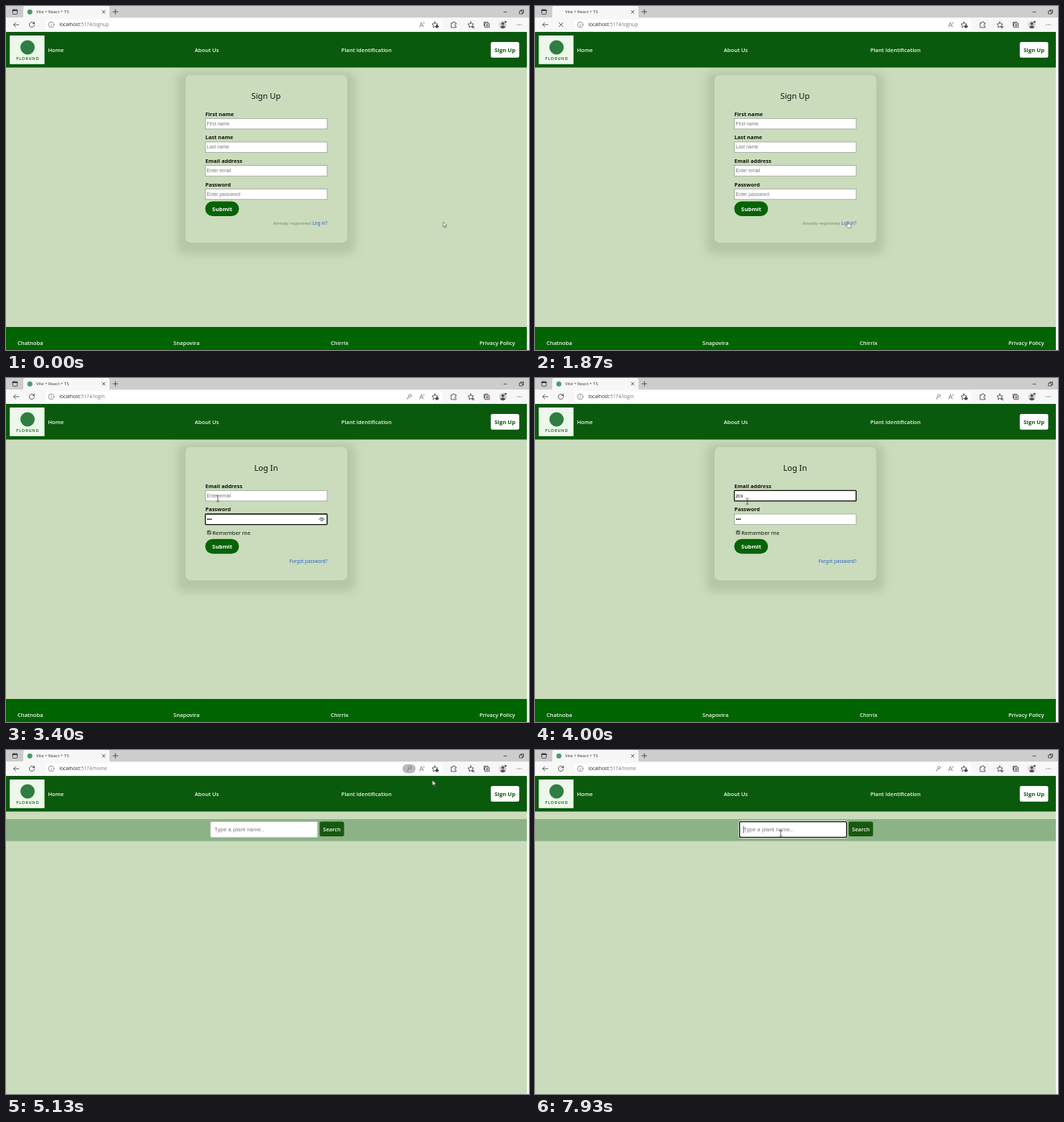
These frames come from a looping animation (728 px wide and 478 px high, 8000 ms). An HTML page:

```html
<!DOCTYPE html>
<html lang="en">
<head>
<meta charset="utf-8">
<title>Plant app walkthrough</title>
<style>
html, body { margin: 0; width: 100%; height: 100%; overflow: hidden; background: #f4f6f2; }
svg { display: block; width: 100vw; height: 100vh; }

.ui { font: 6.75px "Open Sans", "Noto Sans", sans-serif; fill: #777; }
.nav { font: 600 7.6px "Open Sans", "Noto Sans", sans-serif; fill: #f4faf2; }
.form { font: 600 7.45px "Noto Sans", "Open Sans", sans-serif; fill: #0c120a; }
.title { font-size: 11.2px; font-weight: 500; text-anchor: middle; }
.plain { font-size: 7.6px; font-weight: 400; }
.note { font-size: 6.15px; font-weight: 400; fill: #76866f; }
.link { font-size: 6.35px; font-weight: 400; fill: #2a62d0; }
.btn { font: 700 7.8px "Open Sans", "Noto Sans", sans-serif; fill: #fff; text-anchor: middle; }
.hint { font: 6.7px "Liberation Sans", Arial, sans-serif; fill: #7b7b7b; }
.typed { fill: #111; }
.field { fill: #fff; stroke: #8b9887; stroke-width: .7; }
.focus { fill: none; stroke: #0b0b0b; stroke-width: 1.3; }
.pill { fill: #066306; }
.shade { fill: #b4c6a5; filter: blur(6px); }
.card { fill: #cadcbc; }
.line { fill: none; stroke: #333; stroke-width: .8; stroke-linecap: round; stroke-linejoin: round; }
.soft { stroke: #777; }
.pointer { fill: #fff; stroke: #333; stroke-width: .6; stroke-linejoin: round; }

/* One loop is 8 s, so 1% is 80 ms. */
.t { animation: 8s step-end infinite; }
@keyframes signup { 0% { opacity: 1 } 26.25% { opacity: 0 } }
@keyframes login { 0% { opacity: 0 } 26.25% { opacity: 1 } 61.25% { opacity: 0 } }
@keyframes home { 0% { opacity: 0 } 61.25% { opacity: 1 } }
@keyframes footer { 0% { opacity: 1 } 61.25% { opacity: 0 } }
@keyframes loading { 0% { opacity: 0 } 22.5% { opacity: 1 } 26.25% { opacity: 0 } }
@keyframes loaded { 0% { opacity: 1 } 22.5% { opacity: 0 } 26.25% { opacity: 1 } }
@keyframes key { 0% { opacity: 0 } 27% { opacity: 1 } }
@keyframes badge { 0% { opacity: 0 } 61.5% { opacity: 1 } 66.5% { opacity: 0 } }
@keyframes passFocus { 0% { opacity: 0 } 31.5% { opacity: 1 } 43.5% { opacity: 0 } }
@keyframes passHint { 0% { opacity: 1 } 32.5% { opacity: 0 } }
@keyframes pass1 { 0% { opacity: 0 } 32.5% { opacity: 1 } }
@keyframes pass2 { 0% { opacity: 0 } 33.75% { opacity: 1 } }
@keyframes pass3 { 0% { opacity: 0 } 35% { opacity: 1 } }
@keyframes mailFocus { 0% { opacity: 0 } 43.5% { opacity: 1 } 53.5% { opacity: 0 } }
@keyframes mailHint { 0% { opacity: 1 } 45.5% { opacity: 0 } }
@keyframes mail1 { 0% { opacity: 0 } 45.5% { opacity: 1 } }
@keyframes mail2 { 0% { opacity: 0 } 47% { opacity: 1 } }
@keyframes mail3 { 0% { opacity: 0 } 48.5% { opacity: 1 } }
@keyframes hover { 0% { fill: #f4faf2 } 57.4% { fill: #c3ee5c } 60.5% { fill: #f4faf2 } }
@keyframes searchFocus { 0% { opacity: 0 } 81.25% { opacity: 1 } }
@keyframes caret { 0% { opacity: 0 } 81.25% { opacity: 1 } 87.875% { opacity: 0 } 94.5% { opacity: 1 } }

@keyframes arrow {
  0% { opacity: 1 } 9% { opacity: 0 } 25.5% { opacity: 1 } 30.5% { opacity: 0 }
  51% { opacity: 1 } 52.3% { opacity: 0 } 54.8% { opacity: 1 } 57.4% { opacity: 0 }
  60.5% { opacity: 1 } 75.5% { opacity: 0 }
}
@keyframes hand {
  0% { opacity: 0 } 9% { opacity: 1 } 25.5% { opacity: 0 } 52.3% { opacity: 1 }
  54.8% { opacity: 0 } 57.4% { opacity: 1 } 60.5% { opacity: 0 }
}
@keyframes beam { 0% { opacity: 0 } 30.5% { opacity: 1 } 51% { opacity: 0 } 75.5% { opacity: 1 } }

#cursor { animation: path 8s ease-in-out infinite; }
@keyframes path {
  0% { transform: translate(608.5px, 300px) }
  10%, 11.625% { transform: translate(441.5px, 300px) }
  18.75%, 23.75% { transform: translate(435.5px, 299px) }
  31.9%, 38.75% { transform: translate(320px, 196px) }
  42%, 49.4% { transform: translate(295px, 167.5px) }
  53%, 54.4% { transform: translate(303px, 234px) }
  57.75%, 59.4% { transform: translate(74.5px, 63.5px) }
  63.5%, 66.25% { transform: translate(593.5px, 42px) }
  78.75%, 83.75% { transform: translate(400px, 112px) }
  93.75%, 100% { transform: translate(342px, 116px) }
}
</style>
</head>
<body>
<svg viewBox="0 0 728 478">
  <rect y="36" width="725" height="442" fill="#cadcbc"/>

  <!-- Sign-up page -->
  <g class="t form" style="animation-name:signup">
    <rect class="shade" x="238" y="92" width="248" height="253" rx="10"/>
    <rect class="card" x="250" y="96" width="225" height="233" rx="7"/>
    <text class="title" x="362" y="129">Sign Up</text>
    <text x="277.5" y="152.7">First name</text>
    <text x="277.5" y="185.4">Last name</text>
    <text x="277.5" y="218">Email address</text>
    <text x="277.5" y="250.6">Password</text>
    <rect class="field" x="277.5" y="156.3" width="169.5" height="14.6"/>
    <rect class="field" x="277.5" y="189" width="169.5" height="14.6"/>
    <rect class="field" x="277.5" y="221.6" width="169.5" height="14.6"/>
    <rect class="field" x="277.5" y="254.2" width="169.5" height="14.6"/>
    <text class="hint" x="279.5" y="165.7">First name</text>
    <text class="hint" x="279.5" y="198.4">Last name</text>
    <text class="hint" x="279.5" y="231">Enter email</text>
    <text class="hint" x="279.5" y="263.6">Enter password</text>
    <rect class="pill" x="277.3" y="271.5" width="47" height="20.5" rx="10.2"/>
    <text class="btn" x="301" y="284.8">Submit</text>
    <text class="note" x="372" y="304.2">Already registered</text>
    <text class="link" x="447.5" y="304.2" text-anchor="end">Log in?</text>
  </g>

  <!-- Log-in page -->
  <g class="t form" style="animation-name:login">
    <rect class="shade" x="238" y="92" width="248" height="205" rx="10"/>
    <rect class="card" x="250" y="96" width="225" height="185" rx="7"/>
    <text class="title" x="362" y="129">Log In</text>
    <text x="277.5" y="152.7">Email address</text>
    <text x="277.5" y="185.4">Password</text>
    <rect class="field" x="277.5" y="156.3" width="169.5" height="14.6"/>
    <rect class="field" x="277.5" y="189" width="169.5" height="14.6"/>
    <text class="t hint" style="animation-name:mailHint" x="279.5" y="165.7">Enter email</text>
    <text class="t hint" style="animation-name:passHint" x="279.5" y="198.4">Enter password</text>
    <g class="hint typed">
      <text class="t" style="animation-name:mail1" x="279.5" y="165.7">z</text>
      <text class="t" style="animation-name:mail2" x="282.85" y="165.7">c</text>
      <text class="t" style="animation-name:mail3" x="286.2" y="165.7">x</text>
    </g>
    <g fill="#111">
      <circle class="t" style="animation-name:pass1" cx="280.9" cy="196.2" r=".95"/>
      <circle class="t" style="animation-name:pass2" cx="283.2" cy="196.2" r=".95"/>
      <circle class="t" style="animation-name:pass3" cx="285.5" cy="196.2" r=".95"/>
    </g>
    <rect class="t focus" style="animation-name:mailFocus" x="277.5" y="156.3" width="169.5" height="14.6" rx="1"/>
    <g class="t" style="animation-name:passFocus">
      <rect class="focus" x="277.5" y="189" width="169.5" height="14.6" rx="1"/>
      <path class="line" d="M435.5 196.5q4-5 8 0"/>
      <circle class="line" cx="439.5" cy="197.1" r="1.6"/>
    </g>
    <rect x="279.8" y="211.8" width="5.8" height="5.8" rx="1" fill="#5c6659"/>
    <path d="M281 214.8l1.3 1.3 2.3-2.9" fill="none" stroke="#fff" stroke-width=".8"/>
    <text class="plain" x="287.3" y="217.6">Remember me</text>
    <rect class="pill" x="277.3" y="223.8" width="47" height="20.5" rx="10.2"/>
    <text class="btn" x="301" y="237.2">Submit</text>
    <text class="link" x="447.5" y="256.6" text-anchor="end">Forgot password?</text>
  </g>

  <!-- Home page -->
  <g class="t" style="animation-name:home">
    <rect y="96" width="725" height="30.6" fill="#8db287"/>
    <rect x="284.7" y="99.6" width="149" height="21.8" rx="1.5" fill="#fff" stroke="#b9c4b6"/>
    <g class="t" style="animation-name:searchFocus">
      <rect x="283.6" y="98.5" width="151.2" height="24" rx="3" fill="none" stroke="#fff" stroke-width=".8"/>
      <rect class="focus" x="284.7" y="99.6" width="149" height="21.8" rx="2"/>
    </g>
    <text class="hint" style="font-size:7.9px" x="290" y="113">Type a plant name..</text>
    <path class="t line" style="animation-name:caret" d="M290.3 106v9"/>
    <rect x="436.6" y="99.5" width="34" height="20.5" rx="2.5" fill="#175a0f"/>
    <text class="nav" x="453.6" y="112.8" text-anchor="middle">Search</text>
  </g>

  <!-- Site header and footer -->
  <rect y="36" width="725" height="49.5" fill="#0a5a0d"/>
  <rect x="5.2" y="41" width="48.4" height="39.8" fill="#ecf8ea"/>
  <circle cx="30" cy="57.5" r="10" fill="#2f7d40"/>
  <text x="30.4" y="74.7" text-anchor="middle" fill="#23622f" style="font:700 5.4px Lato,sans-serif;letter-spacing:.9px">FLORUND</text>
  <g class="nav">
    <text class="t" style="animation-name:hover" x="58.4" y="64.2">Home</text>
    <text x="262.8" y="64.2">About Us</text>
    <text x="466.8" y="64.2">Plant Identification</text>
  </g>
  <rect x="674.8" y="50" width="39.6" height="21.8" rx="2.5" fill="#fff"/>
  <text class="btn" style="fill:#0c520e" x="694.6" y="64.3">Sign Up</text>
  <g class="t nav" style="animation-name:footer">
    <rect y="446" width="725" height="32" fill="#006400"/>
    <text x="16" y="470.6">Chatnoba</text>
    <text x="233" y="470.6">Snapovira</text>
    <text x="452" y="470.6">Chirrix</text>
    <text x="708.6" y="470.6" text-anchor="end">Privacy Policy</text>
  </g>

  <!-- Browser window -->
  <rect width="728" height="17" fill="#cdcdcd"/>
  <rect y="16" width="728" height="20" fill="#f7f7f7"/>
  <path d="M22 16.5q2 0 2-2V3q0-3 3-3h114q3 0 3 3v11.5q0 2 2 2z" fill="#f7f7f7"/>
  <rect x="55" y="18.5" width="552" height="15" rx="3" fill="#fff"/>
  <g class="line">
    <rect x="9.3" y="5" width="6.4" height="6.4" rx="1"/>
    <path d="M9.5 6.2h6" stroke-width="1.7"/>
    <path d="M134 6.1l4 4m0-4l-4 4M149 8h6.6m-3.3-3.3v6.6M693 8.4h4"/>
    <path d="M715 7h4v4h-4zM716.5 7V5.5h4v4H719"/>
    <path d="M18 26h-7.4m3-3l-3 3 3 3"/>
    <path class="t" style="animation-name:loaded" d="M39.2 24.2a3.6 3.6 0 1 0 .4 2.2M39.6 22v2.5h-2.5"/>
    <path class="t" style="animation-name:loading" d="M33.4 23.2l5.6 5.6m0-5.6l-5.6 5.6"/>
    <g class="soft">
      <circle cx="63" cy="26" r="3.8"/>
      <path d="M63 25.6v2.2m0-4v.1"/>
      <path d="M575.8 29l2.5-6.4 2.5 6.4m-4.2-2h3.4M581.6 22.5q1 1 0 2.4"/>
    </g>
    <path id="star" d="M597 22l1.2 2.6 2.8.4-2 2 .5 2.8-2.5-1.3-2.5 1.3.5-2.8-2-2 2.8-.4z"/>
    <circle cx="600" cy="28.5" r="1.8" fill="#555"/>
    <path d="M620 23.5h2q0-1.8 1.4-1.8t1.4 1.8h1.7v2q-1.8 0-1.8 1.3t1.8 1.3v1.8H620z"/>
    <use href="#star" x="50"/>
    <path d="M649 28.6h2.6m-2 1.6h2"/>
    <path d="M667 24h5.6v5.6H667zM665.4 27.8v-5.4h5.4M669.8 25.4v2.8m-1.4-1.4h2.8"/>
  </g>
  <circle cx="691.6" cy="26" r="5.2" fill="#d4d0d0"/>
  <circle cx="691.6" cy="24.4" r="2" fill="#5a5254"/>
  <path d="M687.8 29.6q3.8-5 7.6 0-3.8 3.2-7.6 0z" fill="#5a5254"/>
  <circle cx="695.4" cy="22" r="1.3" fill="#4a3438"/>
  <path d="M712 26h.1m2.5 0h.1m2.5 0h.1" stroke="#333" stroke-width="1.2" stroke-linecap="round"/>
  <rect class="t" style="animation-name:badge" x="552" y="19.8" width="18" height="12.4" rx="6.2" fill="#b9b9b9"/>
  <g class="t" style="animation-name:key">
    <circle class="line soft" cx="562.3" cy="24.6" r="1.9"/>
    <path class="line soft" d="M561 26l-2.8 2.8h1.6"/>
  </g>
  <circle class="t" style="animation-name:loaded" cx="33.2" cy="8.2" r="3.5" fill="#4a9c6b"/>
  <g class="ui">
    <text x="42" y="10.4" style="font-size:6px;fill:#333">Vite + React + TS</text>
    <text class="t" style="animation-name:signup" x="74.3" y="28.4"><tspan fill="#222">localhost</tspan>:5174/signup</text>
    <text class="t" style="animation-name:login" x="74.3" y="28.4"><tspan fill="#222">localhost</tspan>:5174/login</text>
    <text class="t" style="animation-name:home" x="74.3" y="28.4"><tspan fill="#222">localhost</tspan>:5174/home</text>
  </g>

  <g id="cursor">
    <path class="t pointer" style="animation-name:arrow" d="M0 0v7.2l1.7-1.5 1.1 2.5 1.2-.5-1.1-2.5h2.2z"/>
    <path class="t pointer" style="animation-name:hand" d="M-.8.8q.8-1.4 1.6 0v3l3 .7q.9.3.8 1.4l-.6 3.3h-4L-2.7 6.4q-.4-1.2.8-1l1.1.8z"/>
    <path class="t line" style="animation-name:beam" d="M-1.6-4H-.5L0-3.5.5-4h1.1M0-3.5v7M-1.6 4H-.5L0 3.5.5 4h1.1"/>
  </g>
</svg>
</body>
</html>
```
